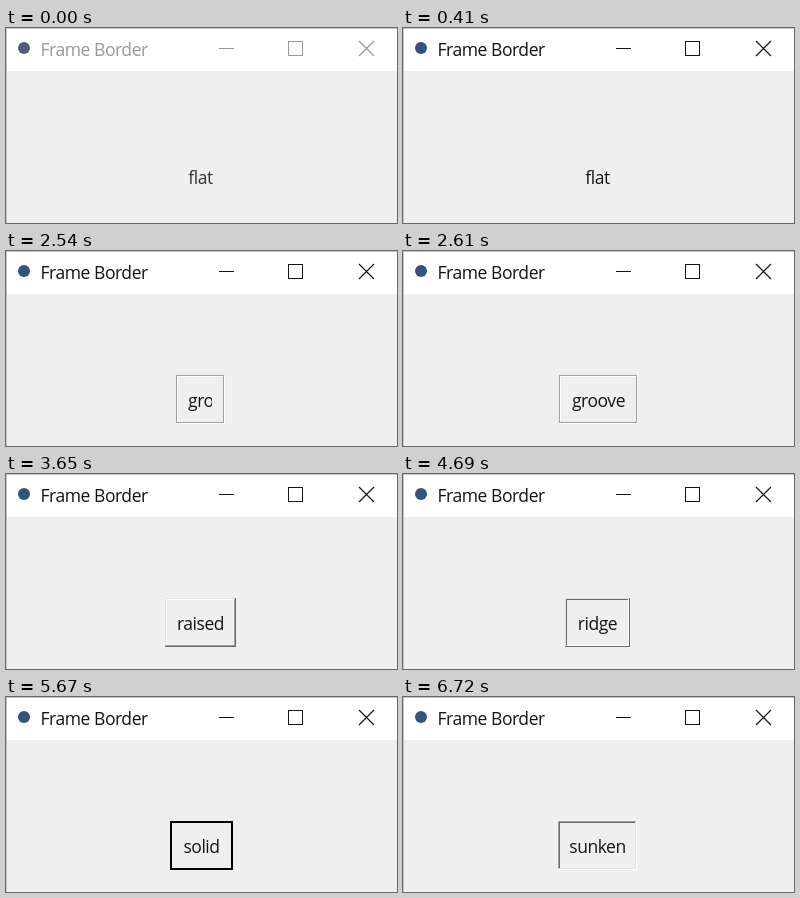
Animation of 391 by 195 pixels, one loop 9.17 s. Source, as an HTML page with a canvas:

```html
<!DOCTYPE html>
<html lang="en">
<head>
<meta charset="utf-8">
<title>Frame Border</title>
<style>
  html, body { margin: 0; width: 100%; height: 100%; overflow: hidden; background: #efefef; }
  canvas { display: block; width: 391px; height: 195px; }
</style>
</head>
<body>
<canvas></canvas>
<script>
const WIDTH = 391, HEIGHT = 195, LOOP = 9170;
const BOX_TOP = 124, BOX_HEIGHT = 49, PADDING = 12;
const LIGHT = '#ffffff', MID = '#a0a0a0', DARK = '#696969', FACE = '#efefef', PALE = '#e3e3e3';
const INK = '#141414', BORDER = '#c6c6c6';

// Bevel colours: outer top-left, outer bottom-right, inner top-left, inner bottom-right.
const bevels = {
  flat: [FACE, FACE, FACE, FACE],
  groove: [MID, LIGHT, LIGHT, MID],
  raised: [PALE, DARK, LIGHT, MID],
  ridge: [PALE, DARK, DARK, LIGHT],
  solid: ['#000', '#000', '#000', '#000'],
  sunken: [MID, LIGHT, DARK, PALE],
};

const states = [
  { start: 0, relief: 'flat', left: 170, width: 49 },
  { start: 2540, relief: 'groove', left: 170, width: 49, clipped: true },
  { start: 2610, relief: 'groove', left: 156, width: 79 },
  { start: 3650, relief: 'raised', left: 159, width: 71 },
  { start: 4690, relief: 'ridge', left: 162, width: 65 },
  { start: 5670, relief: 'solid', left: 164, width: 63 },
  { start: 6720, relief: 'sunken', left: 155, width: 79 },
];

const canvas = document.querySelector('canvas');
const ctx = canvas.getContext('2d');
const scale = window.devicePixelRatio || 1;
canvas.width = WIDTH * scale;
canvas.height = HEIGHT * scale;
ctx.scale(scale, scale);

function rect(color, x, y, w, h) {
  ctx.fillStyle = color;
  ctx.fillRect(x, y, w, h);
}

function text(value, x, y, color, align = 'left') {
  ctx.font = '17.5px "Open Sans", "Noto Sans", sans-serif';
  ctx.letterSpacing = '-0.45px';
  ctx.textAlign = align;
  ctx.fillStyle = color;
  ctx.fillText(value, x, y);
}

function edge(x, y, w, h, topLeft, bottomRight) {
  rect(bottomRight, x, y + h - 1, w, 1);
  rect(bottomRight, x + w - 1, y, 1, h);
  rect(topLeft, x, y, w - 1, 1);
  rect(topLeft, x, y, 1, h - 1);
}

function drawTitleBar(active) {
  const ink = active ? INK : '#999';
  rect('#fff', 0, 0, WIDTH, 43);
  rect(BORDER, 0, 0, WIDTH, 1);
  rect(BORDER, 0, 0, 1, HEIGHT);

  ctx.fillStyle = active ? '#34527c' : '#535d70';
  ctx.beginPath();
  ctx.arc(18, 20, 6, 0, Math.PI * 2);
  ctx.fill();

  text('Frame Border', 34.5, 28, ink);

  ctx.strokeStyle = ink;
  rect(ink, 213, 20, 15, 1);
  ctx.lineWidth = 1;
  ctx.strokeRect(282.5, 13.5, 14, 14);
  ctx.lineWidth = 1.2;
  ctx.beginPath();
  ctx.moveTo(353, 13);
  ctx.lineTo(368, 28);
  ctx.moveTo(368, 13);
  ctx.lineTo(353, 28);
  ctx.stroke();
}

function drawLabel({ relief, left, width, clipped }, color) {
  const [outerTL, outerBR, innerTL, innerBR] = bevels[relief];
  edge(left, BOX_TOP, width, BOX_HEIGHT, outerTL, outerBR);
  edge(left + 1, BOX_TOP + 1, width - 2, BOX_HEIGHT - 2, innerTL, innerBR);

  if (!clipped) {
    text(relief, left + width / 2, 156, color, 'center');
    return;
  }
  ctx.save();
  ctx.beginPath();
  ctx.rect(left + PADDING, BOX_TOP, width - 2 * PADDING - 1, BOX_HEIGHT);
  ctx.clip();
  text(relief, left + PADDING, 156, color);
  ctx.restore();
}

function draw(now) {
  const time = now % LOOP;
  const active = time >= 410;
  rect(FACE, 0, 0, WIDTH, HEIGHT);
  drawTitleBar(active);
  drawLabel(states.findLast(state => time >= state.start), active ? INK : '#333');
  requestAnimationFrame(draw);
}

requestAnimationFrame(() => draw(0));
</script>
</body>
</html>
```
